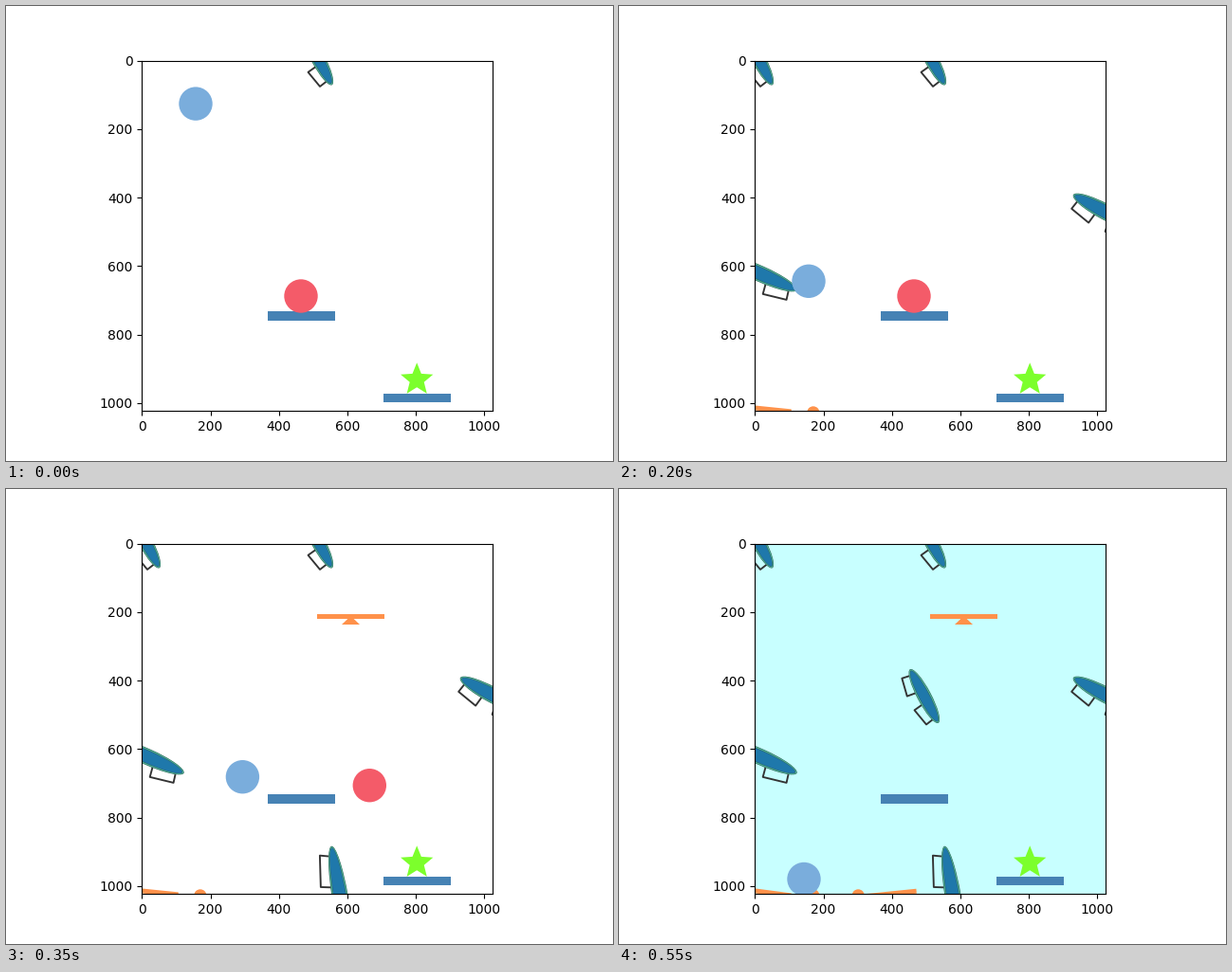
These frames come from a looping animation (640 by 480 pixels, 0.6 s). A matplotlib script:

```python
import numpy as np
import matplotlib.pyplot as plt
from matplotlib.animation import FuncAnimation
from matplotlib.patches import Circle, Ellipse, Polygon, Rectangle
from matplotlib.transforms import Affine2D

W, H, DPI = 640, 480, 100
FRAMES, STEP = 12, 50
PT = 72 / DPI                      # points per pixel
GRAVITY = 15.6                     # pixels per frame squared
WIN_FRAME = 9

BLUE, RED, GREEN = "#7aaddc", "#f45b69", "#7cff2c"
STEEL, ORANGE, CYAN = "#4682b4", "#ff914a", "#c8ffff"

fig, ax = plt.subplots(figsize=(W / DPI, H / DPI), dpi=DPI)
ax.set_xlim(-0.5, 1023.5)
ax.set_ylim(1023.5, -0.5)
ax.set_aspect("equal")
ax.set_xticks(range(0, 1001, 200))
ax.set_yticks(range(0, 1001, 200))

# Stage pixels, origin at the top left
stage = Affine2D().scale(1 / W, -1 / H).translate(0, 1) + fig.transFigure


def add(patch, z=1.0, trans=stage):
    patch.set_transform(trans)
    patch.set_zorder(z)
    return ax.add_patch(patch)


def fill(patch_type, *args, color, z=1.0, trans=stage, **kw):
    return add(patch_type(*args, facecolor=color, edgecolor="none", **kw), z, trans)


def board(x, y, a, h, angle):
    """Springboard with half length a, thickness scale h and two legs."""
    trans = Affine2D().rotate_deg(angle).translate(x, y) + stage
    parts = []
    for side in (-1, 1):
        leg = [(0.22, 6.5), (0.26, 16), (0.86, 12), (0.81, 3)]
        pts = [(side * a * u, h * n) for u, n in leg]
        parts.append(add(Polygon(pts, closed=False, fill=False, edgecolor="#333333",
                                 linewidth=1.9 * PT, joinstyle="round"), 1.0, trans))
    rings = [(0, "#2f6258"), (0.5, "#4fb095"), (1.7, "#2b5f63"), (2.2, "#1f78ab")]
    for inset, color in rings:
        parts.append(fill(Ellipse, (0, 0), 2 * (a - inset), 2 * (7.4 * h - inset),
                          color=color, z=1.1, trans=trans))
    return parts


def bar(x, y, angle, length=71, thick=5):
    trans = Affine2D().rotate_deg(angle).translate(x, y) + stage
    return fill(Rectangle, (-length / 2, -thick / 2), length, thick,
                color=ORANGE, trans=trans)


def knob(x):
    return fill(Circle, (x, 428.9), 6.6, color=ORANGE)


def seesaw(x, y):
    base = [(x, y), (x - 9.5, y + 9), (x + 9.5, y + 9)]
    return [bar(x, y, 0), fill(Polygon, base, color=ORANGE)]


def star(x, y, r, inner=0.44):
    t = np.arange(10) * np.pi / 5
    rad = np.where(np.arange(10) % 2, inner * r, r)
    pts = np.column_stack([x + rad * np.sin(t), y - rad * np.cos(t)])
    return fill(Polygon, pts, color=GREEN)


# Fixed scene
fill(Rectangle, (276, 322.4), 70.8, 9.2, color=STEEL)
fill(Rectangle, (398, 409), 70.8, 9.4, color=STEEL)
star(433.2, 394.3, 18)

# Parts that join the scene, keyed by the frame they first appear in
left_bar = bar(146.3, 424.3, 5.8)
arrivals = {
    0: board(328.8, 55, 32, 1, 62.2),
    1: board(146.8, 55, 32, 1, 62.2),
    2: [left_bar, knob(204.8)],
    3: board(149.2, 282.6, 42, 1.15, 24),
    4: board(512.5, 217, 38, 1.15, 28),
    5: board(352.4, 431, 55, 1.15, 80.4),
    7: seesaw(363.5, 134),
    8: [bar(278.3, 427.8, -5.8), knob(252.2)],
    9: board(321.8, 218.5, 32, 1, 62.2),
}

blue = fill(Circle, (0, 0), 17.7, color=BLUE, z=1.5)
red = fill(Circle, (0, 0), 17.7, color=RED, z=1.5)


def fly(x, y, vx, vy, t):
    return x + vx * t, y + vy * t + GRAVITY / 2 * t * t


def blue_pos(i):
    if i <= 4:                                   # free fall
        return fly(200, 95.3, 0, 0, i + 1)
    if i == 5:                                   # thrown off the board
        return 272, 293.5
    if i <= 9:                                   # back from the red ball
        return fly(264.5, 297, -15.1, -1.1, i - 6)
    return 205 - 10 * (i - 10), 409 + 2.5 * (i - 10)


def red_pos(i):
    if i <= 5:
        return 311, 306
    if i <= 9:                                   # pushed off the platform
        return fly(345.5, 305.6, 37.8, -0.7, i - 6)
    return 497 + 40 * (i - 10), 397


def draw(i):
    for start, parts in arrivals.items():
        for part in parts:
            part.set_visible(i >= start)
    ax.set_facecolor(CYAN if i >= WIN_FRAME else "white")
    tilt = 7.5 if i == FRAMES - 1 else 5.8
    left_bar.set_transform(Affine2D().rotate_deg(tilt).translate(146.3, 424.3) + stage)
    blue.center = blue_pos(i)
    red.center = red_pos(i)
    return []


anim = FuncAnimation(fig, draw, frames=FRAMES, interval=STEP, repeat=True,
                     repeat_delay=0, blit=False)
plt.show()
```
